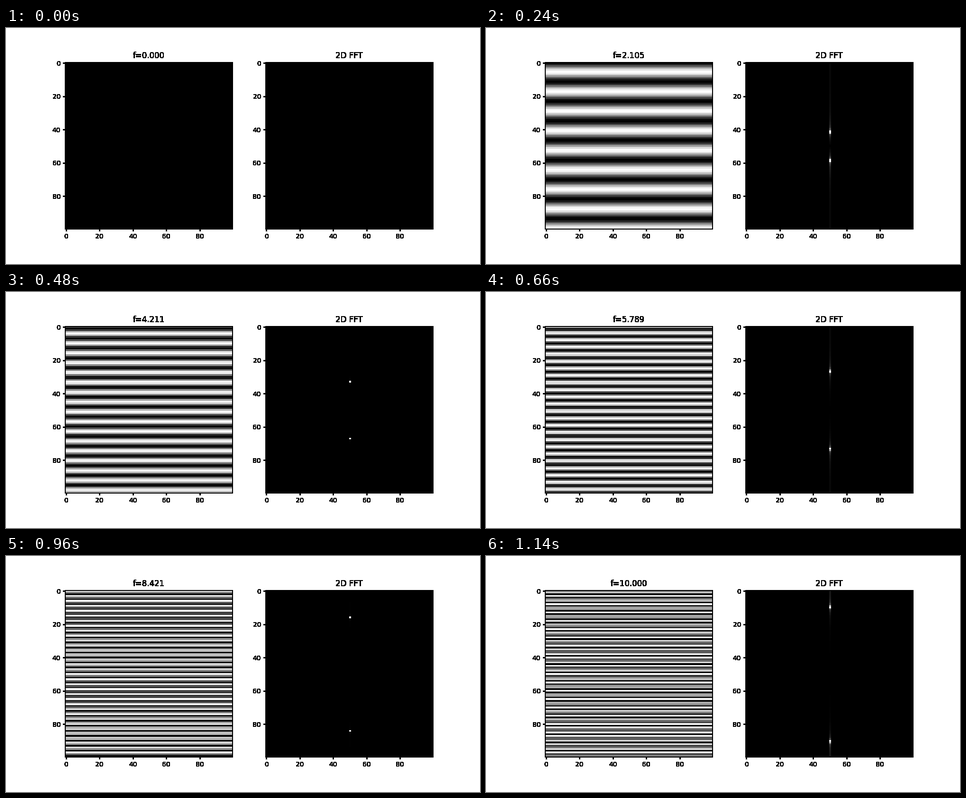
Recreate the animation shown at these times as a matplotlib script. Size 1000x500 px, loop 1.2 s.

```python
import numpy as np
import matplotlib.pyplot as plt
from matplotlib.animation import FuncAnimation

N = 100
STEPS = 20
FREQS = np.linspace(0, 10, STEPS)
y = np.linspace(-2, 2, N)


def solid(img, dpi):
    """Turn every touched pixel solid black, without soft edges."""
    out = np.zeros_like(img)
    out[..., 3] = img[..., 3] > 0
    return out, 0, 0


def wave(f):
    return np.repeat(np.sin(2 * np.pi * f * y)[:, None], N, axis=1)


def spectrum(img):
    return np.abs(np.fft.fftshift(np.fft.fft2(img)))


def make_panel(ax, title):
    im = ax.imshow(np.zeros((N, N)), cmap="gray")
    ax.set_title(title, fontsize=12)
    ax.title.set_agg_filter(solid)
    # frame three pixels wide; the image covers its inner edge
    ax.patch.set(edgecolor="black", linewidth=3 * 72 / 100)
    for axis in (ax.xaxis, ax.yaxis):
        axis.set_ticks(range(0, N, 20))
        for tick in axis.get_major_ticks():
            tick.tick1line.set_agg_filter(solid)
            tick.label1.set_agg_filter(solid)
    return im


plt.rcParams["font.family"] = "DejaVu Sans"
fig, (ax_wave, ax_fft) = plt.subplots(1, 2, figsize=(10, 5), dpi=100,
                                      facecolor="white")
fig.subplots_adjust(left=0.125, right=0.9, bottom=0.125, top=0.88, wspace=0.2)
im_wave = make_panel(ax_wave, "f=0.000")
im_fft = make_panel(ax_fft, "2D FFT")


def update(i):
    data = wave(FREQS[i])
    for im, values in ((im_wave, data), (im_fft, spectrum(data))):
        im.set_data(values)
        im.autoscale()
    ax_wave.title.set_text(f"f={FREQS[i]:.3f}")
    return im_wave, im_fft, ax_wave.title


anim = FuncAnimation(fig, update, frames=STEPS, interval=60,
                     repeat=True, repeat_delay=0, blit=False)
plt.show()
```
